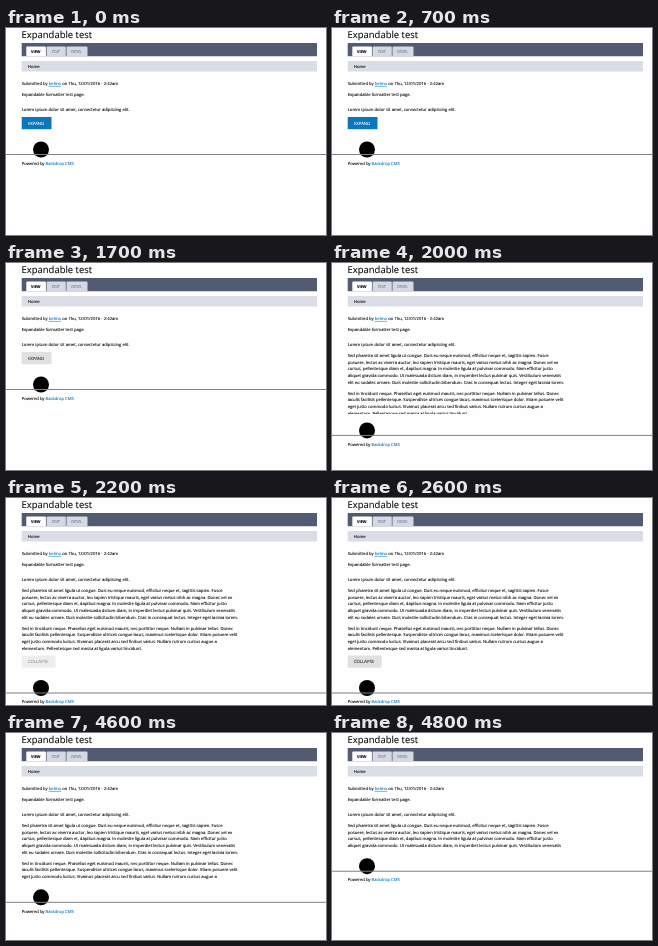
An HTML page for the animation above (4.9 s loop, 320x207 px).

```html
<!DOCTYPE html>
<html lang="en">
<head>
<meta charset="utf-8">
<title>Expandable test</title>
<style>
  html, body { margin: 0; width: 100%; height: 100%; overflow: hidden; background: #fefefe; }
  svg { display: block; width: 100%; height: 100%; --ink: #080808; }
  text, tspan { fill: var(--ink); stroke: var(--ink); stroke-width: .1px; }
  text { font: 4.2px "Open Sans", sans-serif; text-rendering: geometricPrecision; }
  .title { font-size: 9.45px; }
  .tab { font-size: 3.75px; --ink: #7b8190; }
  .active { font-weight: 700; --ink: #080808; }
  .link { --ink: #0a78bf; }
  .under { text-decoration: underline; text-decoration-thickness: .3px; }
</style>
</head>
<body>
<svg viewBox="0 0 320 207">
  <clipPath id="clip"><rect id="window" y="85" width="320" height="0"/></clipPath>

  <text class="title" x="15.6" y="10.3">Expandable test</text>
  <path fill="#525b72" d="M15.7 15H311V28.3H15.7z"/>
  <path fill="#fefefe" d="M20.3 28.3v-8.7q0-1 1-1h17.6q1 0 1 1v8.7z"/>
  <path fill="#d5d9e3" d="M40.6 28.3v-8.7q0-1 1-1h17.2q1 0 1 1v8.7zM60.5 28.3v-8.7q0-1 1-1h19q1 0 1 1v8.7z"/>
  <text class="tab active" x="25.1" y="25">VIEW</text>
  <text class="tab" x="46" y="25">EDIT</text>
  <text class="tab" x="65.2" y="25">DEVEL</text>
  <path fill="#dadde6" d="M15.7 33H311V43.6H15.7z"/>
  <text x="21.8" y="39.9">Home</text>

  <text x="15.7" y="57">Submitted by <tspan class="link under">belmo</tspan> on Thu, 12/01/2016 - 2:42am</text>
  <text x="15.7" y="68">Expandable formatter test page.</text>
  <text x="15.7" y="82.9">Lorem ipsum dolor sit amet, consectetur adipiscing elit.</text>
  <g id="more" clip-path="url(#clip)"></g>

  <g id="button">
    <rect id="face" x="15.7" y="89" height="12.2"/>
    <text id="label" x="21.9" y="96.7" style="font-size:4.3px"></text>
  </g>

  <g id="footer">
    <circle cx="35" cy="-5.5" r="8"/>
    <rect y="-1" width="320" height="1" fill="#808086"/>
    <text x="15.7" y="9.7">Powered by <tspan class="link">Backdrop CMS</tspan></text>
  </g>
</svg>
<script>
const LOOP = 4900, STEP = 100, FULL = 68.5, TOP = 85;
const $ = id => document.getElementById(id);

const paragraphs = [[
  "Sed pharetra sit amet ligula ut congue. Duis eu neque euismod, efficitur neque et, sagittis sapien. Fusce",
  "posuere, lectus ac viverra auctor, leo sapien tristique mauris, eget varius metus nibh ac magna. Donec vel ex",
  "cursus, pellentesque diam et, dapibus magna. In molestie ligula at pulvinar commodo. Nam efficitur justo",
  "aliquet gravida commodo. Ut malesuada dictum diam, in imperdiet lectus pulvinar quis. Vestibulum venenatis",
  "elit eu sodales ornare. Duis molestie sollicitudin bibendum. Cras in consequat lectus. Integer eget lacinia lorem."
], [
  "Sed in tincidunt neque. Phasellus eget euismod mauris, nec porttitor neque. Nullam in pulvinar tellus. Donec",
  "iaculis facilisis pellentesque. Suspendisse ultrices congue lacus, maximus scelerisque dolor. Etiam posuere velit",
  "eget justo commodo luctus. Vivamus placerat arcu sed finibus varius. Nullam rutrum cursus augue a",
  "elementum. Pellentesque sed massa at ligula varius tincidunt."
]];

let y = 94;
for (const lines of paragraphs) {
  for (const line of lines) {
    const text = document.createElementNS("http://www.w3.org/2000/svg", "text");
    text.setAttribute("x", 15.7);
    text.setAttribute("y", y);
    text.textContent = line;
    $("more").append(text);
    y += 6.63;
  }
  y += 4.5;
}

const swing = (t, start, length) => {
  const p = Math.min(1, Math.max(0, (t - start) / length));
  return .5 - Math.cos(Math.PI * p) / 2;
};
const mix = (a, b, k) => `rgb(${a.map((v, i) => Math.round(v + (b[i] - v) * k))})`;
const move = (id, dy) => $(id).setAttribute("transform", `translate(0 ${dy})`);

function draw(now) {
  const t = Math.floor(now % LOOP / STEP) * STEP;
  const open = t >= 1900;
  const sliding = open && t < 2100 || t >= 4500;
  const height = open ? FULL * (swing(t, 1650, 400) - swing(t, 4490, 592)) : 0;
  const grey = swing(t, 1110, 520);

  $("window").setAttribute("height", open && !sliding ? FULL + 2 : height);
  move("button", height);
  $("button").setAttribute("opacity", sliding ? 0 : open ? swing(t, 2000, 400) : 1);
  $("face").setAttribute("width", open ? 33.9 : 29.8);
  $("face").style.fill = mix([8, 120, 190], [224, 224, 224], grey);
  $("label").style.setProperty("--ink", mix([255, 255, 255], [50, 50, 50], grey));
  $("label").textContent = open ? "COLLAPSE" : "EXPAND";
  move("footer", TOP + height + (sliding ? 22 : 42));
  requestAnimationFrame(() => draw(performance.now()));
}
draw(0);
</script>
</body>
</html>
```
